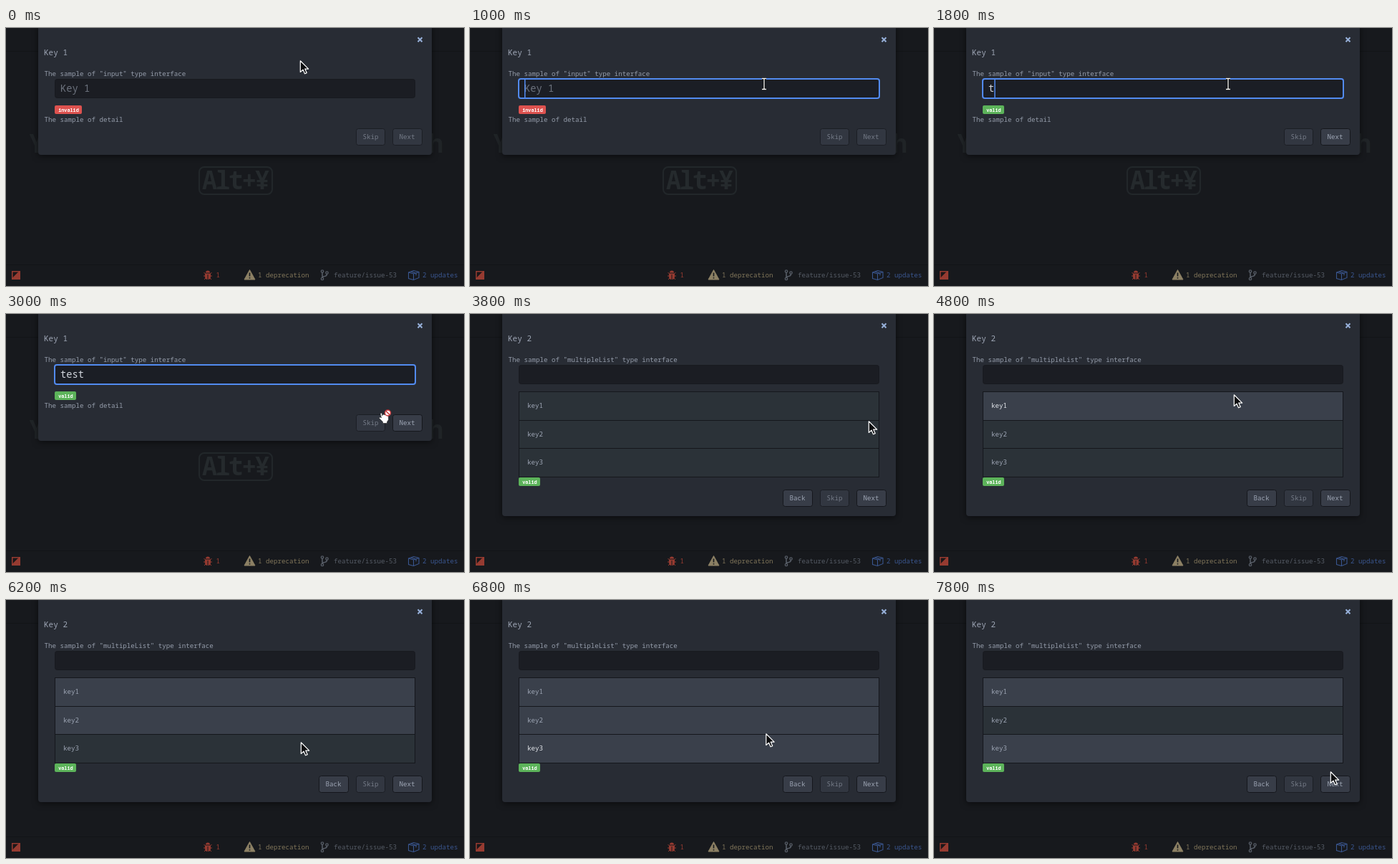
Recreate the animation shown at these times as an HTML page. Size 640x360 px, loop 8000 ms.

```html
<!DOCTYPE html>
<html lang="en">
<head>
<meta charset="utf-8">
<style>
  html, body { margin: 0; width: 100%; height: 100%; overflow: hidden; background: #17191d; }
  svg { display: block; width: 640px; height: 360px; }
  text { font-family: "Noto Sans Mono", "DejaVu Sans Mono", monospace; white-space: pre; }
</style>
</head>
<body>
<svg id="stage" viewBox="0 0 640 360"></svg>
<script>
const LOOP = 8000, STEP = 200;
const INK = '#9da5b4', LINE = '#15171c';
const SMALL = 9.17, TITLE = 11, INPUT = 13.75, TIP = 35;

// Pointer waypoints: time, x, y
const POINTER = [
  [0, 411, 46], [200, 411, 48], [600, 411, 78], [2400, 411, 78], [2600, 430, 90],
  [3000, 527, 143], [3400, 560, 150], [3800, 557, 150], [4000, 549, 143], [4200, 549, 143],
  [4800, 419, 113], [5200, 417, 117], [5600, 416, 158], [5900, 415, 166],
  [6200, 412, 199], [6600, 412, 204], [7000, 415, 170], [7300, 418, 170], [7800, 554, 240]
];

const rect = (x, y, w, h, fill, extra = '') =>
  `<rect x="${x}" y="${y}" width="${w}" height="${h}" fill="${fill}" ${extra}/>`;
const path = (d, extra) => `<path d="${d}" ${extra}/>`;
const text = (s, x, y, size = SMALL, fill = INK, extra = '') =>
  `<text x="${x}" y="${y}" font-size="${size}" fill="${fill}" ${extra}>${s}</text>`;

function pointerAt(t) {
  const i = Math.max(1, POINTER.findIndex(p => p[0] >= t));
  const [t0, x0, y0] = POINTER[i - 1], [t1, x1, y1] = POINTER[i];
  const k = (t - t0) / (t1 - t0);
  return [x0 + (x1 - x0) * k, y0 + (y1 - y0) * k];
}

function workspace() {
  return rect(0, 0, 640, 360, '#17191d')
    + rect(0, 32, 640, 1, '#121417') + rect(0, 330, 640, 1, '#121417');
}

function tip() {
  const tight = 'font-weight="bold" letter-spacing="-2.6"';
  return text('Y', 32, 174, TIP, '#202427', tight)
    + text('h', 590, 174, TIP, '#202427', tight)
    + rect(270, 194, 102, 38, 'none', 'rx="7" stroke="#22272a" stroke-width="2"')
    + text('Alt+¥', 274, 225, TIP, '#252a2d', tight);
}

function statusBar() {
  const red = '#963b31', tan = '#8c8064', grey = '#565c66', blue = '#3a568f';
  const line = (color, w = 1.3) => `fill="none" stroke="${color}" stroke-width="${w}"`;
  return rect(8, 339, 12, 12, red) + path('M9.5 349.5V340.5H18.5Z', 'fill="#1b1719"')
    + path('M9 350L19 340', line(red, 2))
    + path('M279 341.500a3 3 0 0 1 6 0zM278 342.500h8v4.500a4 4 0 0 1-8 0z', `fill="${red}"`)
    + path('M276.500 341l2.500 2.500M287.500 341l-2.500 2.500M276 346h12M277 351l2.500-2.500M287 351l-2.500-2.500', line(red, 1))
    + path('M282 344v7', line('#17191d', 1))
    + text('1', 293.5, 348, SMALL, red)
    + path('M340.5 337.5L348 351H333Z', `fill="${tan}" stroke="${tan}" stroke-linejoin="round"`)
    + path('M340.5 341.5v5M340.5 348v1.6', line('#17191d', 1.6))
    + text('1 deprecation', 352, 348, SMALL, '#81765a')
    + path('M442 341v8M448.500 343q0 3-3.500 3.500-3 .3-3 2', line(grey, 1.6))
    + [[442, 339.5], [448.5, 341.5], [442, 350]].map(([x, y]) =>
        `<circle cx="${x}" cy="${y}" r="1.700" ${line(grey)}/>`).join('')
    + text('feature/issue-53', 458, 348, SMALL, grey)
    + path('M562.500 341l7-2.500 7.500 2v8l-7.500 3-7-2zM562.500 341l7 2 7.500-2.500M569.500 343v8.500M566 340l7 2.200v3', line(blue, 1.1))
    + text('2 updates', 582, 348, SMALL, blue);
}

function panel(height, title, caption) {
  return rect(45, -6, 550, height + 6, '#282c34',
      'rx="4" style="filter:drop-shadow(0 2px 4px #0008)"')
    + path('M575.500 13.300l6 6m0-6l-6 6', 'stroke="#97b0d9" stroke-width="2"')
    + text(title, 53, 38, TITLE) + text(caption, 53.5, 67, SMALL, '#959dab');
}

function button(label, x, y, enabled) {
  const width = label === 'Skip' ? 40 : 41;
  return `<g opacity="${enabled ? 1 : .65}">`
    + rect(x + .5, y + .5, width, 23, '#383d48', `rx="3" stroke="${LINE}"`)
    + text(label, x + 9.5, y + 15) + '</g>';
}

function badge(valid, y) {
  return rect(68, y, valid ? 30 : 38, 12, valid ? '#5cb35a' : '#dd524f', 'rx="2"')
    + text(valid ? 'valid' : 'invalid', 73.2, y + 8.6, 6.8, '#fff', 'font-weight="bold"');
}

function inputStep(t) {
  const focused = t >= 800;
  const typed = 'test'.slice(0, t < 1800 ? 0 : t < 2000 ? 1 : t < 2200 ? 3 : 4);
  const valid = typed !== '';
  const caret = focused && (t <= 2200 ? t % 1600 >= 200 : t % 1200 >= 800);
  return tip() + panel(177, 'Key 1', 'The sample of "input" type interface')
    + (focused
      ? rect(68, 71, 504, 27, '#1b1e25', 'rx="3" stroke="#528bf0" stroke-width="2"')
      : rect(68.5, 71.5, 503, 26, '#1b1d23', 'rx="3" stroke="#181a1f"'))
    + text(typed || 'Key 1', 76, 89, INPUT, valid ? '#d2d6dd' : '#6c727d')
    + (caret ? rect(76 + typed.length * 8.25, 72, 1.5, 25, '#528bf0') : '')
    + badge(valid, 108)
    + text('The sample of detail', 53.5, 131, SMALL, '#959dab')
    + button('Skip', 489, 140, false) + button('Next', 540, 140, valid);
}

function listStep(t) {
  const selected = [t >= 4600, t >= 5600 && t < 7200, t >= 6400];
  const hovered = t >= 4600 && t < 5600 ? 0
    : t >= 5600 && t < 6200 || t >= 7000 && t < 7400 ? 1
    : t >= 6400 && t < 7000 ? 2 : -1;
  const rowTop = i => 108.5 + Math.round(i * 39.6);
  const rows = selected.map((on, i) => {
    const y = rowTop(i);
    return rect(68.5, y, 503, rowTop(i + 1) - y, on ? '#3a404b' : '#2b3238', `stroke="${LINE}"`)
      + text('key' + (i + 1), 80, y + 22.5, SMALL, i === hovered ? '#e3e6eb' : INK);
  }).join('');
  return panel(282, 'Key 2', 'The sample of "multipleList" type interface')
    + rect(68.5, 71.5, 503, 26, '#1b1d23', 'rx="3" stroke="#181a1f"')
    + rows + badge(true, 228)
    + button('Back', 437, 245, true) + button('Skip', 489, 245, false) + button('Next', 540, 245, true);
}

function pointer(t) {
  const [x, y] = pointerAt(t);
  const outline = 'stroke="#fff" stroke-width="1.200" stroke-linejoin="round"';
  let shape;
  if (t >= 600 && t <= 2400) {
    const beam = 'M-3-7.500h2.500l.5 1 .5-1H3M0-7v14M-3 7.500h2.500l.5-1 .5 1H3';
    shape = path(beam, 'fill="none" stroke="#000" stroke-width="3"')
      + path(beam, 'fill="none" stroke="#fff" stroke-width="1.300"');
  } else if (t === 3000) {
    shape = path('M-4-4q1.500-1.500 2.500 0v3l1-2 2 .5 2 0 2 .7 2 1.300v5l-2 3v2h-6v-2l-5-5q0-2 2-1.500l1 1z',
        'fill="#fff" stroke="#222" stroke-width=".6"')
      + '<circle cx="6.500" cy="-5" r="4" fill="#fff" stroke="#c6383b" stroke-width="1.500"/>'
      + path('M3.800-7.700l5.400 5.400', 'stroke="#c6383b" stroke-width="1.500"');
  } else {
    shape = path('M.3-.2v15.700l3.700-3.400 2.500 5.700 2.700-1.200-2.500-5.500h5z', `fill="#0c0d0f" ${outline}`);
  }
  return `<g transform="translate(${x} ${y})">${shape}</g>`;
}

const stage = document.getElementById('stage');
const backdrop = workspace() + statusBar();
let shown = -1;

function draw(now) {
  const t = Math.floor(now % LOOP / STEP) * STEP;
  if (t !== shown) {
    stage.innerHTML = backdrop + (t < 3800 ? inputStep(t) : listStep(t)) + pointer(t);
    shown = t;
  }
  requestAnimationFrame(() => draw(performance.now() - start));
}
const start = performance.now();
draw(0);
</script>
</body>
</html>
```
